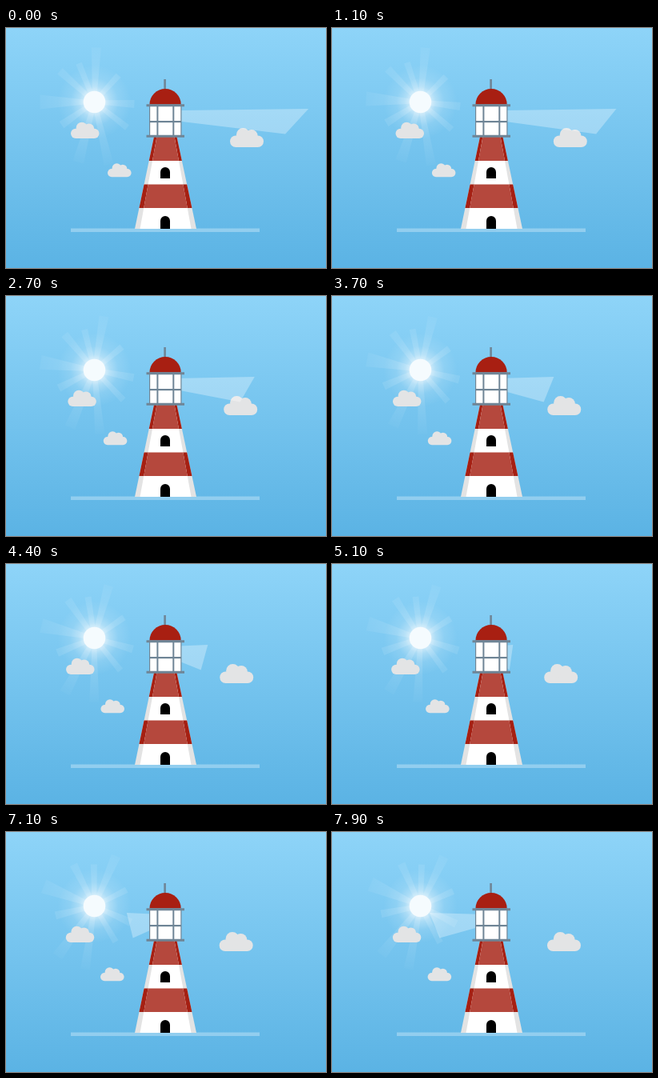
An HTML page that plays this animation: 400 by 300 pixels, repeating every 8000 ms.

```html
<!DOCTYPE html>
<html lang="en">
<head>
<meta charset="utf-8">
<title>Lighthouse</title>
<style>
  html, body { margin: 0; width: 100%; height: 100%; overflow: hidden; background: #75c2ee; }
  svg { display: block; width: 100vw; height: 100vh; }
</style>
</head>
<body>
<svg viewBox="0 0 400 300" preserveAspectRatio="none">
  <defs>
    <linearGradient id="sky" x2="0" y2="1">
      <stop stop-color="#8ed4f8"/>
      <stop offset="1" stop-color="#5bb3e4"/>
    </linearGradient>
    <radialGradient id="glow">
      <stop offset=".28" stop-color="#fff" stop-opacity=".62"/>
      <stop offset=".42" stop-color="#fff" stop-opacity=".36"/>
      <stop offset=".65" stop-color="#fff" stop-opacity=".12"/>
      <stop offset="1" stop-color="#fff" stop-opacity="0"/>
    </radialGradient>
    <radialGradient id="ray" gradientUnits="userSpaceOnUse" cx="0" cy="0" r="82">
      <stop offset=".15" stop-color="#fff" stop-opacity=".16"/>
      <stop offset=".6" stop-color="#fff" stop-opacity=".09"/>
      <stop offset="1" stop-color="#fff" stop-opacity=".015"/>
    </radialGradient>
    <clipPath id="tower"><path d="M185 136H213.5L238 251H161Z"/></clipPath>
    <g id="cloud" fill="#e3e4e5">
      <rect y="9.5" width="42" height="14.5" rx="7.25"/>
      <circle cx="16.3" cy="8.4" r="8.4"/>
      <circle cx="26.8" cy="9.8" r="7.8"/>
    </g>
  </defs>

  <rect width="400" height="300" fill="url(#sky)"/>

  <g transform="translate(110.5 92.5)">
    <g id="rays" fill="url(#ray)"></g>
    <circle r="46" fill="url(#glow)"/>
    <circle r="13.8" fill="#f5fbfe"/>
  </g>

  <g id="clouds"></g>
  <path id="beam" d="M0 103.3L1 101L.838 132.5L0 114.6Z" fill="#fff" fill-opacity=".3"/>

  <rect x="81" y="250.5" width="236" height="4.5" fill="#fff" fill-opacity=".3"/>

  <g clip-path="url(#tower)">
    <rect x="155" y="136" width="90" height="116" fill="#e3e3e3"/>
    <path d="M155 136H245V166H155ZM155 195.5H245V225H155Z" fill="#a52013"/>
    <path d="M188.5 136H210.5L231.5 251H167.5Z" fill="#fff"/>
    <path d="M188.5 136H210.5L216 166H183ZM177.6 195.5H221.4L226.8 225H172.2Z" fill="#b5483d"/>
  </g>
  <path d="M193 251V241a6 6 0 0 1 12 0V251ZM193 188V180a6 6 0 0 1 12 0V188Z" fill="#000"/>

  <rect x="179.5" y="97" width="39.5" height="38" fill="#fff"/>
  <g fill="#6f8596">
    <rect x="179" y="97" width="1.2" height="38"/>
    <rect x="188.4" y="97" width="2" height="38"/>
    <rect x="208.3" y="97" width="2" height="38"/>
    <rect x="218.3" y="97" width="1.2" height="38"/>
    <rect x="179.5" y="116" width="39.5" height="2.2"/>
    <rect x="197.3" y="64" width="2.6" height="14"/>
  </g>
  <path d="M179.5 95.5a19.6 19.6 0 0 1 39.2 0Z" fill="#a81f12"/>
  <path d="M175.5 95.3H223V98.2H175.5ZM175.5 133.8H223V136.8H175.5Z" fill="#6f8596"/>
</svg>
<script>
  const LOOP = 8000, STEP = 100, TURN = 5.85;
  const find = id => document.getElementById(id);

  function add(parent, tag, attrs) {
    const el = document.createElementNS("http://www.w3.org/2000/svg", tag);
    for (const key in attrs) el.setAttribute(key, attrs[key]);
    return parent.appendChild(el);
  }

  // angle clockwise from up, length, outer half width
  const rays = [[2, 68, 6], [42, 45, 4], [93, 50, 5], [128, 52, 4], [167, 80, 6],
                [195, 78, 7], [235, 50, 5], [270, 68, 9], [312, 58, 5], [338, 52, 4]];
  for (const [angle, len, w] of rays)
    add(find("rays"), "path", {
      d: `M-3 -12L${-w} ${-len}H${w}L3 -12Z`,
      transform: `rotate(${angle})`
    });

  // start x, y, scale, drift in px per second
  const clouds = [[81, 117.7, .845, 1.35], [127, 169.3, .705, 1.95], [280, 125, 1, 2.9]]
    .map(([x, y, scale, speed]) => ({
      x, y, scale, speed, el: add(find("clouds"), "use", { href: "#cloud" })
    }));

  function draw(ms) {
    const t = Math.floor(ms % LOOP / STEP) * STEP / 1000;
    const drift = TURN - Math.abs(TURN - t);
    for (const c of clouds)
      c.el.setAttribute("transform",
        `translate(${c.x - c.speed * drift} ${c.y}) scale(${c.scale})`);

    // the beam turns about the tower, seen from the side
    const reach = 201 * Math.sin(.189 * (5.82 - t));
    find("beam").setAttribute("transform", `translate(199 0) scale(${reach} 1)`);
    find("rays").setAttribute("transform", `rotate(${3 * t})`);
  }

  const start = performance.now();
  function tick() {
    draw(performance.now() - start);
    requestAnimationFrame(tick);
  }
  tick();
</script>
</body>
</html>
```
